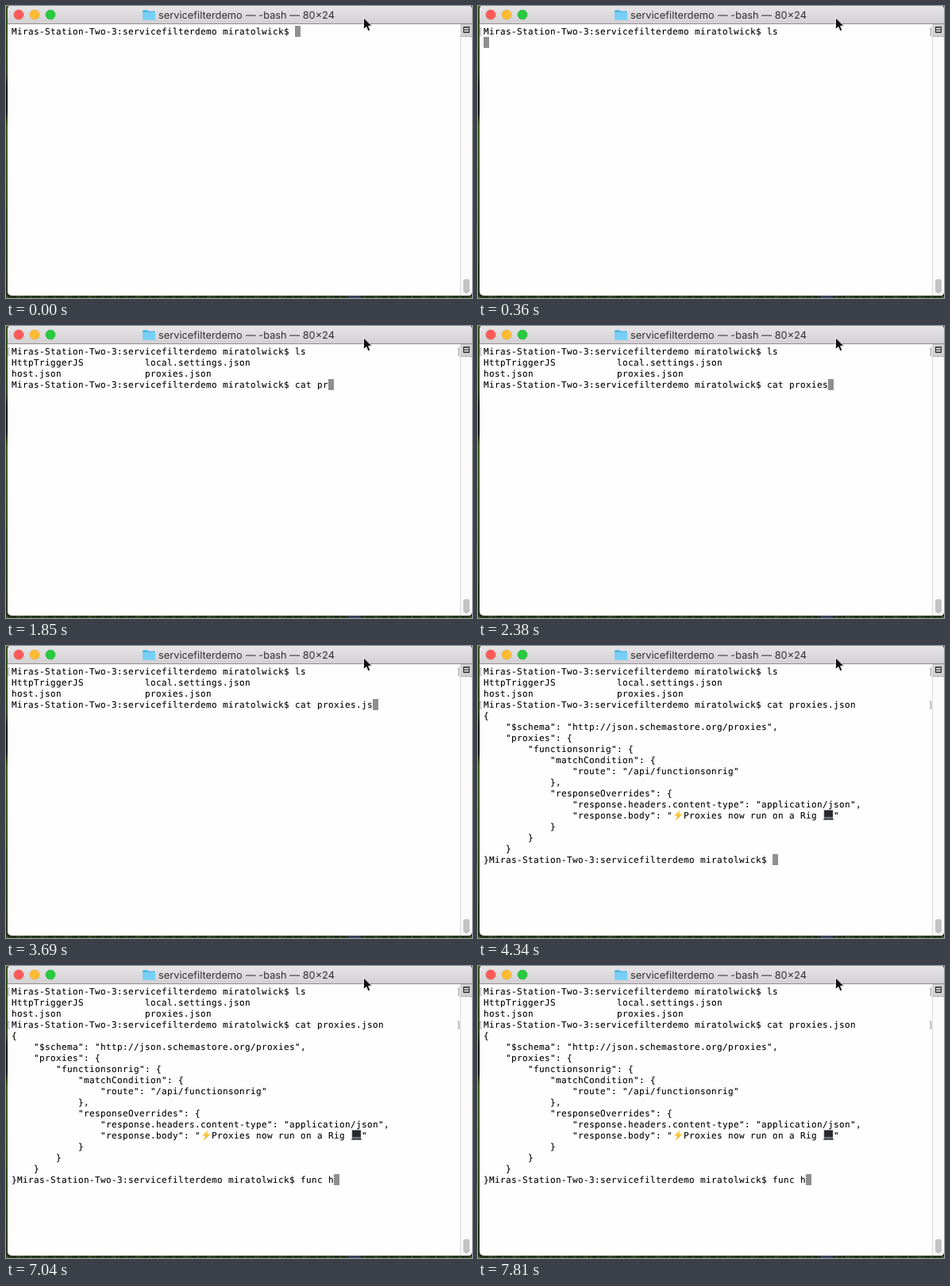
Animation, 587 px wide and 369 px high, one loop 8000 ms. Source, as an HTML page:

```html
<!DOCTYPE html>
<html lang="en">
<head>
<meta charset="utf-8">
<title>Terminal session</title>
<style>
  html, body { margin: 0; width: 100%; height: 100%; overflow: hidden; }
  svg { display: block; }
  .title { font: 12.8px Inter, "Liberation Sans", sans-serif; fill: #303030; text-rendering: geometricPrecision; }
  #rows text, #marks text {
    font: 11px "DejaVu Sans Mono", monospace; letter-spacing: .378px;
    white-space: pre; text-rendering: geometricPrecision;
  }
  #rows { stroke: #000; stroke-width: .1px; }
  #marks { fill: #8c8c8c; }
</style>
</head>
<body>
<svg width="587" height="369" viewBox="0 0 587 369">
  <defs>
    <linearGradient id="bar" x2="0" y2="1">
      <stop stop-color="#e6e4e6"/><stop offset="1" stop-color="#d2d0d2"/>
    </linearGradient>
    <linearGradient id="desk" x2="0" y2="1">
      <stop stop-color="#36521c"/><stop offset=".23" stop-color="#2c401a"/>
      <stop offset=".28" stop-color="#14120e"/><stop offset=".36" stop-color="#14120e"/>
      <stop offset=".41" stop-color="#3f5c22"/><stop offset="1" stop-color="#24331a"/>
    </linearGradient>
    <linearGradient id="bolt" x2="0" y2="1">
      <stop stop-color="#ffd84a"/><stop offset="1" stop-color="#f7a51c"/>
    </linearGradient>
  </defs>

  <rect width="587" height="369" fill="url(#desk)"/>
  <path d="M0 367.500H587" stroke="#4a5c30" stroke-width="3" stroke-dasharray="3 5 1 4 6 2 2 7" opacity=".6"/>
  <rect x="431" y="365" width="16" height="4" fill="#3b4563"/>
  <rect x="2" y="-1" width="585" height="367" rx="5" fill="#fefefe"/>
  <path d="M2 23V5q0-5 5-5H582q5 0 5 5V23z" fill="url(#bar)"/>
  <path d="M2 22.500H587" stroke="#8f8d8f"/>
  <g stroke-width=".6">
    <circle cx="16" cy="11" r="6" fill="#fc5b57" stroke="#df4744"/>
    <circle cx="36" cy="11" r="6" fill="#fdbc32" stroke="#de9f2c"/>
    <circle cx="56" cy="11" r="6" fill="#29c940" stroke="#1eab30"/>
  </g>
  <path d="M172 6.500q0-1.500 1.500-1.500h4l1.500 1.500h7.500q1.500 0 1.500 1.500v8q0 1.500-1.500 1.500h-13q-1.500 0-1.500-1.500z" fill="#55b7e3"/>
  <rect x="172" y="8" width="16" height="9.500" rx="1" fill="#78cff5"/>
  <text class="title" x="192" y="16">servicefilterdemo</text>
  <text class="title" x="414" y="16" text-anchor="end">— -bash — 80×24</text>

  <path d="M572 23H587V361q0 5-5 5H572z" fill="#fafafa"/>
  <path d="M572.500 23V366" stroke="#dadada"/>
  <path d="M573 23H587V38H573z" fill="#d0d0d0"/>
  <path d="M572 38.500H587" stroke="#b5b5b5"/>
  <path d="M576.500 26.500h7v7h-7z" fill="#777" stroke="#2c2c2c"/>
  <path d="M577 28.500h6M577 31.500h6" stroke="#ddd"/>
  <rect x="576" y="345" width="8" height="18" rx="4" fill="#c2c2c2"/>

  <rect id="cursor" width="7" height="14" fill="#8f8f8f"/>
  <g id="marks"></g>
  <g id="rows"></g>
  <g id="emoji">
    <path d="M255 207l-8 7.500h4.500l-3 6 9.500-8h-5z" fill="url(#bolt)"/>
    <path d="M436 207.500h11v9h-11z" fill="#26282b" stroke="#77797c" stroke-width=".6"/>
    <path d="M436 217h11l1 3h-13z" fill="#55585c"/>
  </g>
  <path d="M450.500 15v14.500l3.400-3.200 2.300 5.400 2.600-1.100-2.300-5.300h4.500z" fill="#111" stroke="#fff" stroke-width=".8"/>
</svg>
<script>
const LOOP = 8000, CELL = 7, LINE = 14, LEFT = 7, TOP = 25;
const prompt = 'Miras-Station-Two-3:servicefilterdemo miratolwick$ ';
const listing = `HttpTriggerJS           local.settings.json
host.json               proxies.json
`;
const config = `{
    "$schema": "http://json.schemastore.org/proxies",
    "proxies": {
        "functionsonrig": {
            "matchCondition": {
                "route": "/api/functionsonrig"
            },
            "responseOverrides": {
                "response.headers.content-type": "application/json",
                "response.body": "  Proxies now run on a Rig   "
            }
        }
    }
}`;

// Each event appends text to the screen; '\b' deletes one character.
const events = [];
const put = (time, text) => events.push([time, text]);
const type = (from, to, text) => [...text].forEach((c, i, all) =>
  put(from + (to - from) * i / (all.length - 1), c));

put(0, prompt);
put(60, 'l');
put(240, 's');
put(330, '\n');
put(420, listing + prompt);
type(1080, 1130, 'ca');
type(1370, 1430, 't ');
type(1730, 2380, 'proxies');
put(2680, '.');
put(3040, 's');
put(3400, '\b');
type(3570, 3930, 'json');
put(4280, '\n');
put(4340, config + prompt);
put(6320, 'f');
type(6440, 6740, 'unc ');
put(7040, 'h');
put(7220, 'so');
type(7690, 7810, '\b\b');

const $ = id => document.getElementById(id);
const label = (text, col, row) => {
  const el = document.createElementNS('http://www.w3.org/2000/svg', 'text');
  el.setAttribute('x', LEFT + col * CELL);
  el.setAttribute('y', TOP + row * LINE + 11);
  el.textContent = text;
  return el;
};

const screenAt = time => events.reduce((out, [at, text]) =>
  at > time + .01 ? out : text === '\b' ? out.slice(0, -1) : out + text, '');

let shown;
function draw(time) {
  const screen = screenAt(time);
  if (screen === shown) return;
  shown = screen;
  const rows = screen.split('\n'), last = rows.length - 1;
  $('rows').replaceChildren(...rows.map((text, row) => label(text, 0, row)));
  $('marks').replaceChildren(...rows.flatMap((text, row) =>
    row < last && text.startsWith(prompt) ? [label('[', -1, row), label(']', 80, row)] : []));
  $('cursor').setAttribute('x', LEFT + rows[last].length * CELL);
  $('cursor').setAttribute('y', TOP + last * LINE);
  $('emoji').style.display = last > 13 ? '' : 'none';
}

const start = performance.now();
function tick() {
  draw((performance.now() - start) % LOOP);
  requestAnimationFrame(tick);
}
tick();
</script>
</body>
</html>
```
